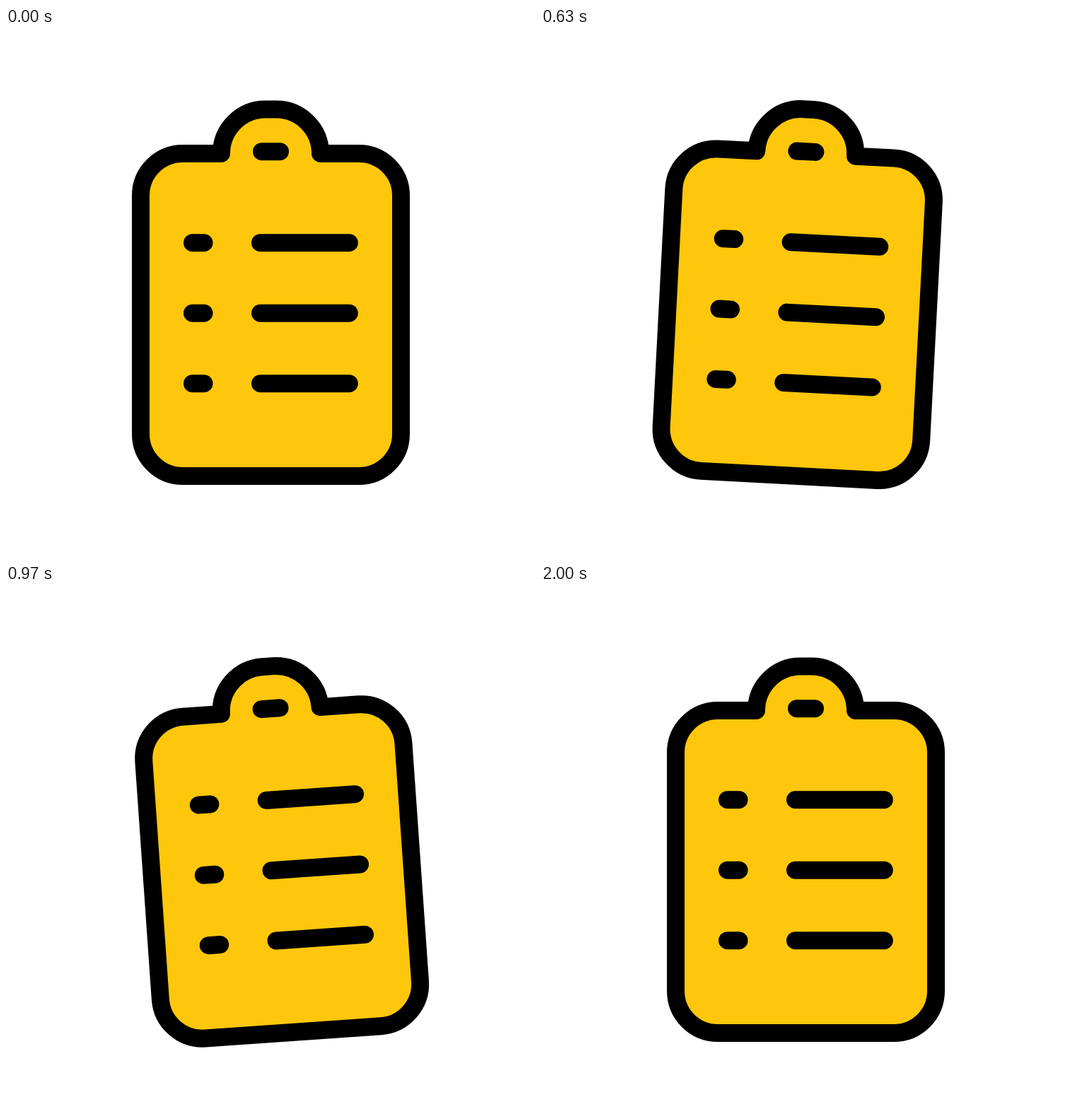
Write an HTML page with a canvas that moves like this. It is 748 px wide and 748 px high and loops after 2.03 s.

```html
<!DOCTYPE html>
<html lang="en">
<head>
<meta charset="utf-8">
<title>Swinging clipboard</title>
<style>
  html, body { margin: 0; width: 100%; height: 100%; overflow: hidden; background: #fff; }
  canvas { display: block; width: 100vmin; height: 100vmin; }
</style>
</head>
<body>
<canvas id="stage" width="748" height="748"></canvas>
<script>
const SIZE = 748;
const LOOP = 2030;
const PIVOT = { x: 374.5, y: 181 };
// [tick, degrees], 30 ticks per second, linear in between
const SWING = [[11, 0], [16, -15], [21, 15], [26, -10], [31, 0]];

const ctx = document.getElementById('stage').getContext('2d');

function makeBoard() {
  const left = 190.5, right = 558.5, top = 177.5, bottom = 633.5, r = 59.5;
  const clipLeft = 304.5, clipRight = 444.5, clipR = 62.5;
  const p = new Path2D();
  p.moveTo(left + r, top);
  p.lineTo(clipLeft, top);
  p.arc(clipLeft + clipR, top, clipR, Math.PI, Math.PI * 1.5);
  p.arc(clipRight - clipR, top, clipR, -Math.PI / 2, 0);
  p.lineTo(right - r, top);
  p.arcTo(right, top, right, bottom, r);
  p.arcTo(right, bottom, left, bottom, r);
  p.arcTo(left, bottom, left, top, r);
  p.arcTo(left, top, right, top, r);
  p.closePath();
  return p;
}

function makeMarks() {
  const p = new Path2D();
  const bar = (x1, x2, y) => { p.moveTo(x1, y); p.lineTo(x2, y); };
  bar(361.5, 387.5, 174.7);
  for (let row = 0; row < 3; row++) {
    const y = 303.7 + row * 99.5;
    bar(263.5, 280, y);
    bar(359.5, 485.3, y);
  }
  return p;
}

const board = makeBoard();
const marks = makeMarks();

// Whole ticks, each starting on a multiple of 10 ms
function tickAt(ms) {
  return Math.floor((Math.floor(ms / 10) + 0.5) * 0.3);
}

function angleAt(tick) {
  for (let i = 1; i < SWING.length; i++) {
    const [t0, a0] = SWING[i - 1], [t1, a1] = SWING[i];
    if (tick >= t0 && tick < t1) return a0 + (a1 - a0) * (tick - t0) / (t1 - t0);
  }
  return 0;
}

function draw(ms) {
  ctx.setTransform(1, 0, 0, 1, 0, 0);
  ctx.fillStyle = '#fff';
  ctx.fillRect(0, 0, SIZE, SIZE);

  ctx.translate(PIVOT.x, PIVOT.y);
  ctx.rotate(angleAt(tickAt(ms)) * Math.PI / 180);
  ctx.translate(-PIVOT.x, -PIVOT.y);

  ctx.lineWidth = 25;
  ctx.lineCap = ctx.lineJoin = 'round';
  ctx.strokeStyle = '#000';
  ctx.fillStyle = '#ffc70b';
  ctx.fill(board);
  ctx.stroke(board);
  ctx.stroke(marks);
}

const start = performance.now();
function loop() {
  draw((performance.now() - start) % LOOP);
  requestAnimationFrame(loop);
}
loop();
</script>
</body>
</html>
```
